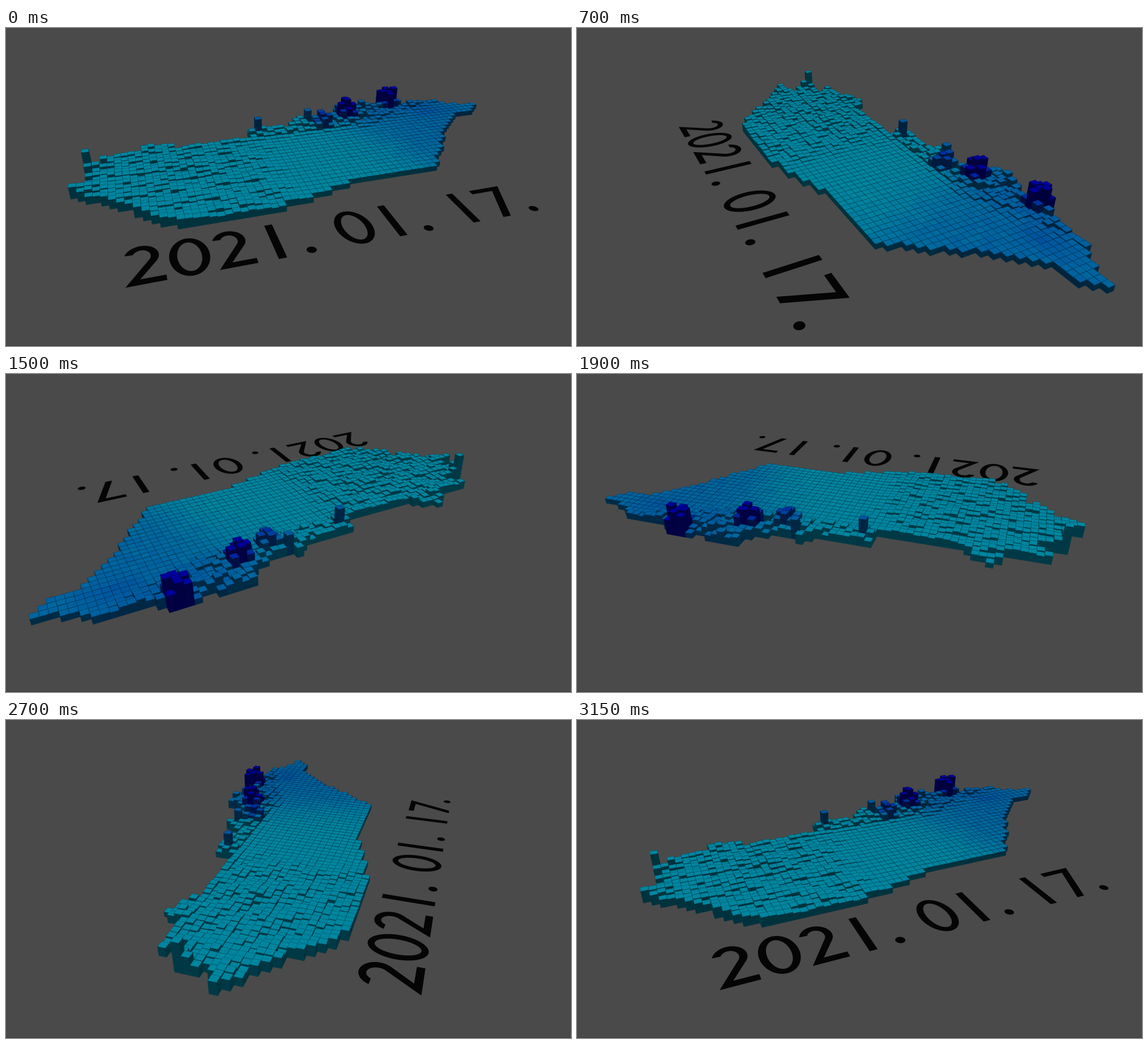
A matplotlib script that plays this animation: 998 px wide and 561 px high, repeating every 3200 ms.

```python
import numpy as np
import matplotlib.pyplot as plt
from matplotlib.animation import FuncAnimation
from matplotlib.collections import PolyCollection
from matplotlib.patches import PathPatch, Rectangle
from matplotlib.path import Path

W, H, DPI = 998, 561, 64
FRAMES, STEP = 64, 50
BG, INK = "#4a4a4a", "#050505"

# Camera: focal length in pixels, pitch, turntable pivot in camera space
FOCAL, PITCH = 975, np.radians(31.5)
PX, PY, PZ = 0.0115, -0.1128, 2.433
CAM_B = -PY * np.sin(PITCH) + PZ * np.cos(PITCH)
START = np.radians(-16.5)

CELL = 0.0293  # ground size of 0.1 degree
HALF = CELL * 0.492
BORDER = [
    (16.05, 46.85), (16.30, 47.10), (16.25, 47.40), (16.65, 47.50),
    (16.38, 47.72), (17.05, 47.70), (17.00, 47.92), (17.16, 48.02),
    (17.60, 47.80), (18.72, 47.77), (18.80, 48.06), (19.50, 48.10),
    (19.70, 48.23), (19.95, 48.13), (20.30, 48.27), (20.55, 48.56),
    (21.10, 48.48), (21.50, 48.57), (21.75, 48.35), (22.25, 48.40),
    (22.60, 48.12), (22.95, 48.05), (22.70, 47.75), (22.35, 47.72),
    (21.95, 47.35), (21.30, 46.40), (21.10, 46.15), (19.80, 46.10),
    (19.20, 45.92), (18.50, 45.72), (17.90, 45.72), (17.20, 45.83),
    (16.80, 46.30), (16.40, 46.60),
]
# lon, lat, rise, radius, cold
HILLS = [
    (16.3, 47.38, 0.080, 0.09, 0.0), (17.9, 47.10, 0.015, 0.20, 0.0),
    (18.9, 47.90, 0.085, 0.08, 0.35), (19.8, 48.15, 0.050, 0.08, 0.3),
    (20.0, 47.90, 0.065, 0.14, 0.55), (20.5, 48.10, 0.085, 0.15, 1.1),
    (21.4, 48.42, 0.085, 0.15, 1.1),
]


def sigmoid(x):
    return 1 / (1 + np.exp(-x))


def project(e, n, z, turn):
    """Ground east/north/up to stage pixels."""
    c, s = np.cos(turn), np.sin(turn)
    a, b = e * c + n * s, e * s - n * c
    depth = PZ - b * np.cos(PITCH) - z * np.sin(PITCH)
    drop = PY + b * np.sin(PITCH) - z * np.cos(PITCH)
    return np.stack([W / 2 + FOCAL * (a + PX) / depth,
                     H / 2 + FOCAL * drop / depth], axis=-1)


def build_map():
    rng = np.random.default_rng(17)
    lon, lat = np.meshgrid(np.arange(161, 231) / 10, np.arange(457, 487) / 10)
    pts = np.column_stack([lon.ravel(), lat.ravel()])
    lon, lat = pts[Path(BORDER).contains_points(pts)].T
    n = len(lon)

    # Rolling west, rugged north, flat plain in the south-east
    west = sigmoid((18.8 - lon) / 0.12)
    north = (lon > 18.7) * sigmoid(
        (lat - 47.78 - 0.38 * np.maximum(lon - 20.8, 0)) / 0.05)
    waves = sum(np.sin(kx * lon + ky * lat + p)
                for kx, ky, p in rng.normal(0, 9, (6, 3)))
    height = 0.024 + west * (0.010 + 0.0028 * waves + rng.normal(0, 0.002, n))
    height += 0.018 * np.exp((16 - lon) / 0.6)
    height += north * (0.014 + rng.normal(0, 0.010, n))
    height += rng.normal(0, 0.0003, n)

    tint = 0.01 + 0.25 * sigmoid((lon + 0.35 * (lat - 47) - 20.75) / 0.28)
    tint += 0.11 * np.exp(-((lon - 22.0) / 0.35) ** 2 - ((lat - 47.95) / 0.25) ** 2)
    tint += north * 0.06 * sigmoid((lon - 19.8) / 0.1)
    tint += rng.normal(0, 0.018, n) * sigmoid((lon - 20) / 0.3)
    for x, y, rise, r, cold in HILLS:
        bump = np.exp(-(np.hypot(lon - x, lat - y) / r) ** 4)
        height += rise * bump * rng.uniform(0.7, 1.1, n)
        tint += cold * bump

    east = -0.9195 + (lon - 16.05) * CELL * 10
    up = 0.449 + (lat - 48.55) * CELL * 10
    return east, up, np.maximum(height, 0.022), np.clip(tint, 0, 1)


E, N, Z, T = build_map()
TOP = np.stack([0 * T, 0.525 * (1 - T), 0.625 - 0.02 * T], axis=1)


def bars(turn):
    """Quads and colours of all blocks, farthest first."""
    c, s = np.cos(turn), np.sin(turn)
    cam_e, cam_n = CAM_B * s - PX * c, -CAM_B * c - PX * s
    order = np.argsort(-np.hypot(E - cam_e, N - cam_n))
    e, n, z, top = E[order], N[order], Z[order], TOP[order]
    se, sn = np.sign(cam_e - e), np.sign(cam_n - n)

    def quad(de, dn, heights):
        corners = ([e + k * HALF for k in de], [n + k * HALF for k in dn], heights)
        return project(*(np.stack(v, axis=1) for v in corners), turn)

    wall = [0 * z, 0 * z, z, z]
    verts = np.stack([
        quad([se] * 4, [-1, 1, 1, -1], wall),
        quad([-1, 1, 1, -1], [sn] * 4, wall),
        quad([-1, 1, 1, -1], [-1, -1, 1, 1], [z] * 4)], axis=1)
    side_e = top * np.where(se > 0, 0.40, 0.43)[:, None]
    side_n = top * np.where(sn > 0, 0.43, 0.38)[:, None]
    face = np.stack([side_e, side_n, top], axis=1)
    edge = np.stack([side_e, side_n, top * 0.52], axis=1)
    return verts.reshape(-1, 4, 2), face.reshape(-1, 3), edge.reshape(-1, 3)


def arc(cx, cy, rx, ry, start, stop, count=40):
    t = np.radians(np.linspace(start, stop, count))
    return np.column_stack([cx + rx * np.cos(t), cy + ry * np.sin(t)])


# Outlines centred on x = 0, standing on y = 0
GLYPHS = {
    "0": [arc(0, 0.1, 0.068, 0.103, 0, 360), arc(0, 0.1, 0.041, 0.079, 360, 0)],
    "1": [np.array([(-0.0145, 0), (0.0145, 0), (0.0145, 0.2), (-0.0145, 0.2)])],
    "2": [np.vstack([arc(-0.007, 0.143, 0.058, 0.061, 162, -35),
                     [(-0.018, 0.027), (0.065, 0.027), (0.065, 0), (-0.065, 0)],
                     arc(-0.007, 0.143, 0.031, 0.036, -35, 152)])],
    "7": [np.array([(-0.061, 0.198), (0.071, 0.198), (-0.006, 0), (-0.038, 0),
                    (0.029, 0.172), (-0.061, 0.172)])],
    ".": [arc(0, 0.0165, 0.0175, 0.0175, 0, 360)],
    " ": [],
}
ADVANCE = {".": 0.064, " ": 0.084}


def layout(text, x=-0.745, baseline=-0.638):
    rings = []
    for ch in text:
        step = ADVANCE.get(ch, 0.15)
        rings += [ring + (x + step / 2, baseline) for ring in GLYPHS[ch]]
        x += step
    return rings


OUTLINES = layout("2021. 01. 17.")


def date_path(turn):
    parts = []
    for ring in OUTLINES:
        ring = np.vstack([ring, ring[:1]])
        codes = [Path.MOVETO] + [Path.LINETO] * (len(ring) - 2) + [Path.CLOSEPOLY]
        parts.append(Path(project(ring[:, 0], ring[:, 1], 0, turn), codes))
    return Path.make_compound_path(*parts)


fig = plt.figure(figsize=(W / DPI, H / DPI), dpi=DPI, facecolor=BG)
ax = fig.add_axes([0, 0, 1, 1])
ax.set(xlim=(0, W), ylim=(H, 0))
ax.axis("off")
ax.add_patch(Rectangle((0, H - 1), W, 1, color="#3a3a3a", lw=0, zorder=0))
date = ax.add_patch(PathPatch(date_path(START), fc=INK, lw=0, zorder=1))
blocks = ax.add_collection(PolyCollection([], linewidths=0.45, zorder=2),
                           autolim=False)


def update(i):
    turn = START + 2 * np.pi * i / FRAMES
    date.set_path(date_path(turn))
    verts, face, edge = bars(turn)
    blocks.set_verts(verts)
    blocks.set_facecolor(face)
    blocks.set_edgecolor(edge)
    return date, blocks


anim = FuncAnimation(fig, update, frames=FRAMES, interval=STEP,
                     repeat=True, repeat_delay=0, blit=False)
plt.show()
```
